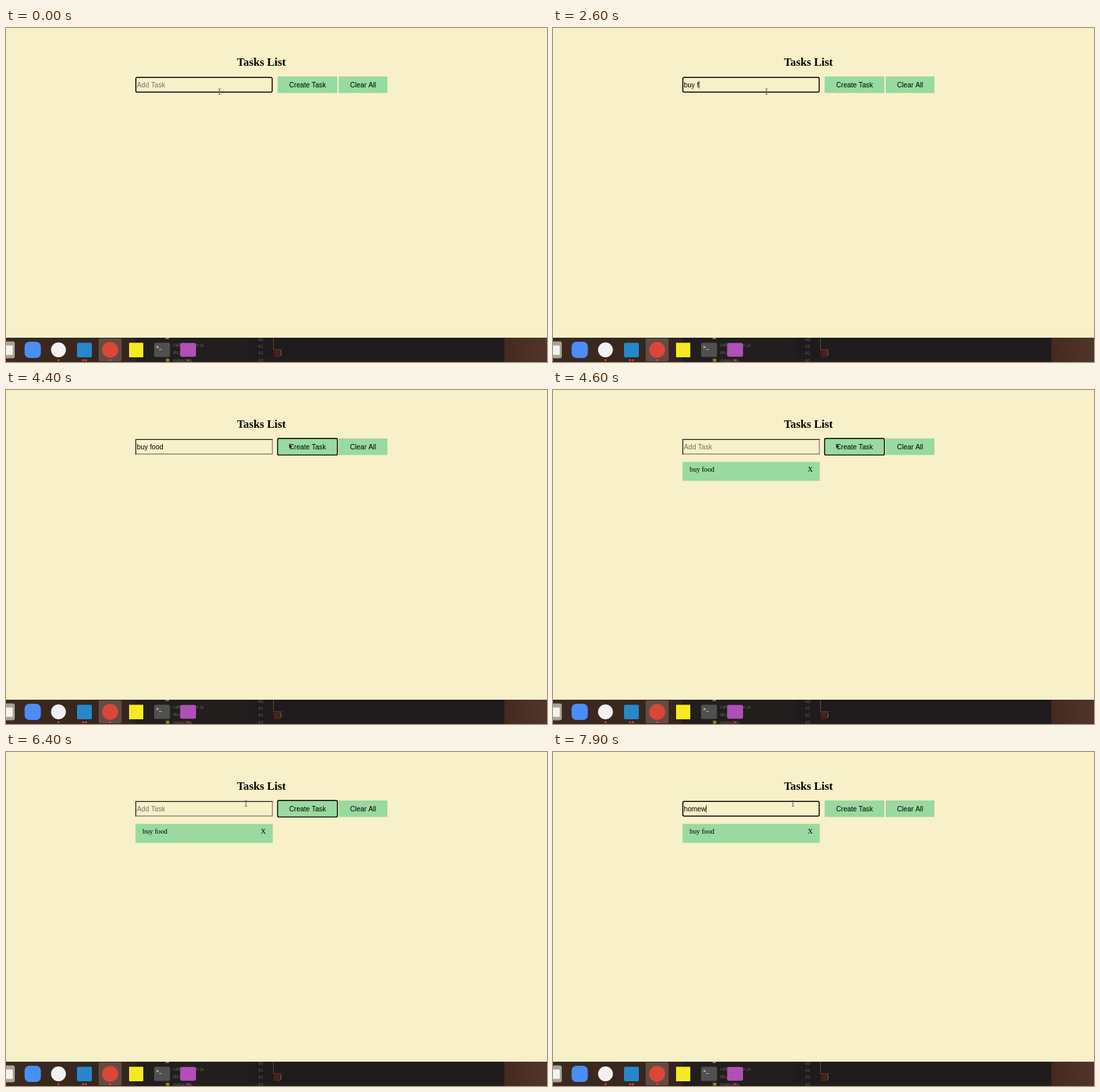
Animation of 800x495 px, one loop 8 s. Source, as an HTML page with a canvas:

```html
<!DOCTYPE html>
<html lang="en">
<head>
<meta charset="utf-8">
<title>Tasks List</title>
<style>
html, body { margin: 0; width: 100%; height: 100%; overflow: hidden; background: #f8f0c8; }
canvas { display: block; width: 800px; height: 495px; }
</style>
</head>
<body>
<canvas id="stage"></canvas>
<script>
const LOOP = 8000;
const PAGE = '#f8f0c8', GREEN = '#98da9f', INK = '#000';
const SANS = '10.2px "Liberation Sans", Arial, sans-serif';
const SERIF = '10.25px "Liberation Serif", Times, serif';
const TITLE = 'bold 16.7px "Liberation Serif", Times, serif';
const CODE = '6.4px "DejaVu Sans", sans-serif';

// [start, field text, caret visible]
const typing = [
  [0, '', false], [200, '', true], [800, '', false],
  [1400, 'b', true], [1600, 'bu', true], [1700, 'buy', true], [2300, 'buy', false],
  [2400, 'buy ', true], [2600, 'buy f', true], [2800, 'buy fo', true],
  [3000, 'buy foo', true], [3100, 'buy food', true], [3700, 'buy food', false],
  [4300, 'buy food', true], [4400, 'buy food', false], [4600, '', false],
  [7000, '', true], [7200, 'h', true], [7300, 'ho', true],
  [7600, 'hom', true], [7700, 'home', true], [7900, 'homew', true]
];

// [start, x, y] of the mouse; it moves in discrete steps
const mouse = [
  [0, 315.7, 94], [3700, 334.8, 90.5], [3800, 356, 88], [3900, 372, 87],
  [4100, 387, 86], [4200, 405, 84], [4300, 418.7, 79],
  [5600, 416, 79], [5900, 405, 79], [6000, 390, 78], [6100, 372, 77],
  [6200, 360, 76.5], [6400, 354.8, 76]
];

const canvas = document.getElementById('stage');
const ctx = canvas.getContext('2d');
const dpr = window.devicePixelRatio || 1;
canvas.width = 800 * dpr;
canvas.height = 495 * dpr;
ctx.scale(dpr, dpr);

const at = (track, t) => track.reduce((found, step) => step[0] <= t ? step : found);

function box(x, y, w, h, color) {
  ctx.fillStyle = color;
  ctx.fillRect(x, y, w, h);
}

function rounded(x, y, w, h, r, color, line) {
  ctx.beginPath();
  ctx.roundRect(x, y, w, h, r);
  if (line) {
    ctx.strokeStyle = color;
    ctx.lineWidth = line;
    ctx.stroke();
  } else {
    ctx.fillStyle = color;
    ctx.fill();
  }
}

function disc(x, y, r, color) {
  ctx.beginPath();
  ctx.arc(x, y, r, 0, 7);
  ctx.fillStyle = color;
  ctx.fill();
}

function text(str, x, y, font, color = INK, align = 'left') {
  ctx.font = font;
  ctx.fillStyle = color;
  ctx.textAlign = align;
  ctx.fillText(str, x, y);
}

function polyline(points, color, width) {
  ctx.beginPath();
  points.forEach(([x, y]) => ctx.lineTo(x, y));
  ctx.strokeStyle = color;
  ctx.lineWidth = width;
  ctx.stroke();
}

function drawField(value, caret, focused) {
  if (focused) {
    rounded(192, 73.2, 201.6, 21.8, 2, INK, 1.5);
  } else {
    polyline([[393.9, 73.2], [393.9, 94.9], [191.5, 94.9]], '#777468', 1.2);
    polyline([[191.9, 95.4], [191.9, 73.4], [394.4, 73.4]], '#181818', 1.3);
  }
  text(value || 'Add Task', 193.5, 87.5, SANS, value ? INK : '#77756c');
  if (caret) {
    const x = 193.5 + (value ? ctx.measureText(value).width : 0);
    box(x, 78.6, 0.8, 11, INK);
  }
}

function drawButton(label, x, w, focused) {
  box(x, 71.8, w, 24.5, GREEN);
  if (focused) rounded(x - 0.1, 71.7, w + 0.2, 24.7, 2, INK, 1.4);
  text(label, x + w / 2, 87.5, SANS, INK, 'center');
}

function drawTask(label) {
  box(191.5, 106.6, 203, 28, GREEN);
  text(label, 202, 121.2, SERIF);
  text('X', 376.8, 121.2, SERIF);
}

function drawMouse(x, y) {
  const overField = x < 395;
  if (overField) {
    box(x - 0.5, y - 4, 1, 8.4, '#55534b');
    box(x - 2, y - 4.4, 4, 0.9, '#858071');
    box(x - 2, y + 4, 4, 0.9, '#858071');
    return;
  }
  ctx.save();
  ctx.translate(x, y);
  ctx.beginPath();
  [[0, 0], [0, 7.4], [1.7, 5.9], [2.8, 8.4], [4, 7.9], [2.9, 5.5], [5.1, 5.3]]
    .forEach(([px, py]) => ctx.lineTo(px, py));
  ctx.closePath();
  ctx.strokeStyle = '#d8e6cf';
  ctx.lineWidth = 1;
  ctx.stroke();
  ctx.fillStyle = '#181818';
  ctx.fill();
  ctx.restore();
}

function drawTaskbar() {
  const wood = ctx.createLinearGradient(0, 0, 800, 0);
  wood.addColorStop(0, '#3c2a20');
  wood.addColorStop(0.24, '#35241c');
  wood.addColorStop(0.92, '#44291f');
  wood.addColorStop(1, '#50362a');
  box(0, 459, 800, 36, wood);

  // Code editor showing through the bar
  box(191, 459, 546, 36, '#1f1b1c');
  box(191, 459, 168, 36, '#231e1e');
  box(359, 490, 378, 5, '#211d20');
  ['callFunction.js', 'do.js', 'index1.js'].forEach((name, i) => {
    const y = 472 + i * 11.3;
    text(name, 247, y, CODE, '#716a63');
    box(236.5, y - 4.5, 5, 4.5, '#8f812e');
  });
  box(236, 459, 5, 2, '#8f812e');
  [40, 41, 42, 43].forEach((n, i) => text(n, 372.5, 464 + i * 10.2, CODE, '#625c59'));
  box(395, 459, 0.8, 17, '#696030');
  box(395, 476, 14, 0.8, '#544c2d');
  box(396, 477, 9, 11, '#4b1f1b');
  text('}', 404, 484.5, '8px "DejaVu Sans Mono", monospace', '#9c8c42');

  // Files
  rounded(-12, 464.5, 25, 25, 3, '#aaa397');
  rounded(-10, 470.5, 20, 14, 1, '#f4f2ed');

  rounded(137, 460, 34, 34, 2, '#624c42');
  rounded(27.5, 465, 24, 24, 7, '#4b8df6');
  disc(77.6, 477, 11, '#f3f0f1');
  rounded(105, 466.5, 22, 21.5, 2, '#2588ca');
  disc(154, 477, 11.8, '#dc4639');
  box(182, 466.5, 21, 21.5, '#f5ea22');

  // Terminal
  rounded(219, 466.5, 23.5, 21, 2, '#50504f');
  text('>_', 222, 474.5, 'bold 7px "DejaVu Sans Mono", monospace', '#e7e7e7');

  rounded(257.5, 466.8, 23.5, 20.5, 3, '#b14fb8');
  [77.6, 114, 118.2, 154, 269.3].forEach(x => disc(x, 492.3, 1.5, '#e04a2e'));
}

function draw(t) {
  const [, value, caret] = at(typing, t);
  const [, x, y] = at(mouse, t);
  const buttonFocus = t >= 4400 && t < 7000;
  box(0, 0, 800, 495, PAGE);
  text('Tasks List', 377.6, 56, TITLE, INK, 'center');
  drawField(value, caret, !buttonFocus);
  drawButton('Create Task', 401.7, 88.3, buttonFocus);
  drawButton('Clear All', 492, 72, false);
  if (t >= 4600) drawTask('buy food');
  drawMouse(x, y);
  drawTaskbar();
}

const start = performance.now();
function tick() {
  draw((performance.now() - start) % LOOP);
  requestAnimationFrame(tick);
}
tick();
</script>
</body>
</html>
```
